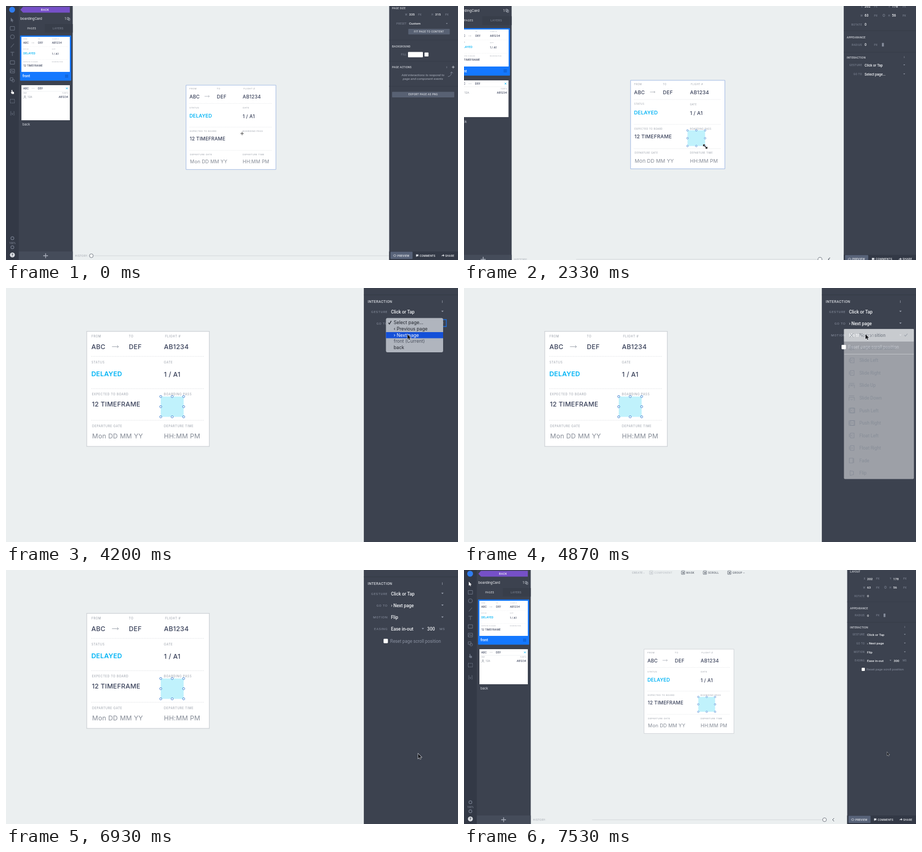
An HTML page with a canvas that plays this animation: 850x478 px, repeating every 8.2 s.

```html
<!DOCTYPE html>
<html lang="en">
<head>
<meta charset="utf-8">
<title>Prototype editor</title>
<style>
  html, body { margin: 0; width: 100%; height: 100%; overflow: hidden; background: #ebeff0; }
  canvas { display: block; }
</style>
</head>
<body>
<canvas id="stage" width="850" height="478"></canvas>
<script>
const ctx = document.getElementById('stage').getContext('2d');
const LOOP = 8200, STEP = 1000 / 15;
const UI = 'Roboto, sans-serif', INTER = 'Inter, sans-serif';
const PANEL = '#3c424f', DARK = '#333946', MUTED = '#8b92a2', BLUE = '#1478ff';
const PANE_RIGHT = 125.5, PANEL_LEFT = 720.6;

// Pointer path in editor coordinates: time, x, y
const POINTER = [
  [0, 444, 240], [65, 444, 240], [133, 441, 239.5], [265, 441, 239.5],
  [1067, 482, 293], [1130, 481, 289], [1267, 476, 276], [1460, 476, 276],
  [1533, 472.4, 267.8], [2334, 472.4, 267.8], [2800, 754.4, 165.3], [3133, 792, 137],
  [3660, 792, 137], [3933, 782, 149], [4130, 782, 149], [4200, 780.8, 152.9],
  [4867, 780.8, 152.9], [4933, 789, 152.9], [5500, 789, 152.9],
  [6340, 795.5, 340], [6467, 795.5, 342.5], [LOOP, 795.5, 342.5]
];
const PAGES = ['Select page...', '‹ Previous page', '› Next page', 'front (Current)', 'back'];
const TRANSITIONS = ['No transition', 'Custom transition', 'Slide Left', 'Slide Right', 'Slide Up',
  'Slide Down', 'Push Left', 'Push Right', 'Float Left', 'Float Right', 'Fade', 'Flip'];

const clamp = v => Math.max(0, Math.min(1, v));
const ease = v => (1 - Math.cos(Math.PI * clamp(v))) / 2;

function pointerAt(t) {
  const i = Math.max(1, POINTER.findIndex(p => p[0] >= t));
  const [a, b] = [POINTER[i - 1], POINTER[i]];
  const k = ease((t - a[0]) / (b[0] - a[0]));
  return { x: a[1] + (b[1] - a[1]) * k, y: a[2] + (b[2] - a[2]) * k };
}

function zoomAt(t) {
  if (t < 2325) return 0;
  return ease((t - 2224) / 455) - ease((t - 7028) / 500);
}

// Text is placed by the middle of its capitals.
function text(str, x, y, size, color, { weight = 400, font = UI, space = 0, align = 'left', style = '' } = {}) {
  ctx.font = `${style} ${weight} ${size}px ${font}`;
  ctx.letterSpacing = space + 'px';
  ctx.textAlign = align;
  ctx.fillStyle = color;
  ctx.fillText(str, x, y + size * 0.36);
}
function rect(x, y, w, h, color, r = 0) {
  ctx.fillStyle = color;
  ctx.beginPath();
  ctx.roundRect(x, y, w, h, r);
  ctx.fill();
}
function frame(x, y, w, h, color, width = 1, r = 0) {
  ctx.strokeStyle = color;
  ctx.lineWidth = width;
  ctx.beginPath();
  ctx.roundRect(x, y, w, h, r);
  ctx.stroke();
}
function circle(x, y, r, fill, stroke, width = 1) {
  ctx.beginPath();
  ctx.arc(x, y, r, 0, 7);
  if (fill) { ctx.fillStyle = fill; ctx.fill(); }
  if (stroke) { ctx.strokeStyle = stroke; ctx.lineWidth = width; ctx.stroke(); }
}
function path(d, x, y, { stroke, fill, width = 1, scale = 1 }) {
  const shape = new Path2D(d);
  ctx.save();
  ctx.translate(x, y);
  ctx.scale(scale, scale);
  ctx.lineWidth = width;
  if (stroke) { ctx.strokeStyle = stroke; ctx.stroke(shape); }
  if (fill) { ctx.fillStyle = fill; ctx.fill(shape); }
  ctx.restore();
}
const ARROW = 'M0 0V7.6L1.8 6L3 8.6L4.2 8L3 5.5H5.4Z';
const RESIZE = 'M-3 -3L3 3M-3.2 -0.5V-3.2H-0.5M3.2 0.5V3.2H0.5';
const HAND = 'M-1 3.5L-3 0.5L-1.5 0V-4H0V-1L3 0V3.5Z';

function card(x, y, border) {
  ctx.save();
  ctx.translate(x, y);
  rect(0, 0, 169, 158.7, '#fff');
  if (border) frame(0, 0, 169, 158.7, border, 0.9);
  ctx.setLineDash([1.2, 1]);
  for (const d of [34.4, 79, 122.6]) path(`M6 ${d}H162`, 0, 0, { stroke: '#d9dcdf', width: 0.6 });
  ctx.setLineDash([]);
  const label = (s, lx, ly) => text(s, lx, ly, 4.1, '#979da7', { font: INTER, space: 0.42 });
  const value = (s, vx, vy, color = '#39415a', weight = 500) =>
    text(s, vx, vy, 9, color, { font: INTER, weight, space: 0.18 });
  label('FROM', 6.5, 7);
  label('TO', 58, 7);
  label('FLIGHT #', 108, 7);
  label('STATUS', 6.5, 42.7);
  label('GATE', 106.5, 43);
  label('EXPECTED TO BOARD', 7, 87);
  label('BOARDING PASS', 106.5, 87);
  label('DEPARTURE GATE', 7.5, 130.6);
  label('DEPARTURE TIME', 106.5, 130.6);
  value('ABC', 6.3, 21.3);
  value('DEF', 58, 21.3);
  value('AB1234', 106.5, 21.3);
  path('M0 0H9M7 -1.8L9 0L7 1.8', 34.8, 21, { stroke: '#9aa0aa', width: 0.7 });
  value('DELAYED', 6.3, 58.2, '#00b4f5', 600);
  value('1 / A1', 106.5, 59.2);
  value('12 TIMEFRAME', 7, 100.6);
  value('Mon DD MM YY', 7.5, 144.2, '#858b96', 400);
  value('HH:MM PM', 106.5, 144.2, '#858b96', 400);
  ctx.restore();
}

function toolStrip(hotspotTool) {
  rect(0, 0, 24, 478, DARK);
  circle(11.5, 7, 5.5, '#2f7df0');
  const stroke = '#6c7484', icon = { stroke };
  path(ARROW, 9, 22, { fill: hotspotTool ? stroke : '#fff' });
  frame(8, 38.5, 8, 7, stroke);
  circle(12, 58, 3.8, null, stroke);
  path('M9 78L15 71', 0, 0, icon);
  path('M8.5 87H15.5M12 87V94', 0, 0, icon);
  frame(8, 103, 8, 6.5, stroke);
  frame(8, 119, 8, 7, stroke);
  path('M8 125L11 121L13 124L15 122', 0, 0, icon);
  frame(8, 135, 5, 5, stroke);
  circle(13.5, 140.5, 2.5, null, stroke);
  path(HAND, 12, 162, { fill: hotspotTool ? '#fff' : stroke });
  ctx.setLineDash([2, 1]);
  frame(8, 175.5, 8, 7, stroke);
  ctx.setLineDash([]);
  text('[v]', 12, 202, 8, stroke, { align: 'center' });
  circle(12, 437, 2.8, null, stroke, 1.4);
  text('100%', 12, 446, 5, MUTED, { align: 'center' });
  circle(12, 454, 2.8, null, stroke, 1.4);
  circle(12, 468.5, 4.6, '#dfe2e7');
  text('?', 12, 468.5, 7, DARK, { align: 'center', weight: 700 });
}

function thumbnail(y, draw) {
  ctx.save();
  ctx.beginPath();
  ctx.rect(29, y, 91, 66);
  ctx.clip();
  rect(29, y, 91, 66, '#fff');
  ctx.translate(29, y);
  draw();
  ctx.restore();
}

function pagesPane() {
  rect(24, 0, PANE_RIGHT - 24, 478, PANEL);
  path('M27 7L32 1.5H120V12.5H32Z', 0, 0, { fill: '#7650c8' });
  text('BACK', 73.5, 7, 5, '#fff', { align: 'center', weight: 500, space: 0.5 });
  text('boardingCard', 27, 24, 6.8, '#e8eaee');
  text('1', 110, 24, 6.5, '#e8eaee');
  frame(115, 21.5, 3, 4, '#aab0bc', 0.8);
  frame(117, 23, 3, 4, '#aab0bc', 0.8);
  rect(73, 34, PANE_RIGHT - 73, 16, '#383e4a');
  text('PAGES', 48.5, 42, 4.8, '#e8eaee', { align: 'center', space: 0.4 });
  text('LAYERS', 98, 42, 4.8, MUTED, { align: 'center', space: 0.6 });
  rect(26.5, 55.5, 96, 85, BLUE, 1);
  thumbnail(58, () => { ctx.scale(0.54, 0.54); card(0, 0); });
  text('front', 31, 132, 6.6, '#fff', { weight: 500 });
  path('M0 0H6M0 2H6M0 4H6', 111, 130, { stroke: '#0a4fb0', width: 0.8 });
  thumbnail(149, () => {
    const ink = '#39415a', bold = { font: INTER, weight: 500 };
    text('ABC', 3.5, 6, 4.9, ink, bold);
    path('M0 0H6', 19, 6, { stroke: '#b5bac2', width: 0.5 });
    text('DEF', 31, 6, 4.9, ink, bold);
    path('M-1.5 -1.5L1.5 1.5M1.5 -1.5L-1.5 1.5', 85.5, 6, { stroke: '#00b4f5', width: 0.9 });
    path('M3 11.5H88', 0, 0, { stroke: '#e3e6e8', width: 0.5 });
    text('SEAT', 4, 15, 2.6, '#a4a9b2');
    text('FLIGHT #', 88, 15, 2.6, '#a4a9b2', { align: 'right' });
    circle(6.5, 21, 1.2, null, '#858b96', 0.7);
    path('M4 25Q6.5 21 9 25', 0, 0, { stroke: '#858b96', width: 0.7 });
    text('12A', 11.5, 22.5, 4.9, '#858b96');
    text('AB1234', 88, 22.5, 4.9, ink, { ...bold, align: 'right' });
  });
  text('back', 31, 223, 6.6, '#c9cdd5');
  rect(24, 462, PANE_RIGHT - 24, 16, '#454c5a');
  path('M-4.5 0H4.5M0 -4.5V4.5', 74.5, 470, { stroke: '#aab0bc', width: 1.4 });
}

function topBar() {
  const item = (s, x, color) => text(s, x, 5, 5, color, { weight: 500, space: 0.35 });
  const glyph = (x, color) => { frame(x, 2, 6, 6, color, 0.9); rect(x + 2, 4, 2.5, 2.5, color); };
  item('CREATE ›', 316, '#b0b5bc');
  glyph(349, '#c3c7cc');
  item('COMPONENT', 358, '#c3c7cc');
  for (const [s, x] of [['MASK', 418], ['SCROLL', 459], ['GROUP –', 505]]) {
    glyph(x - 9, '#646a74');
    item(s, x, '#646a74');
  }
}

function historyBar(done) {
  path(done ? 'M241 470H674' : 'M165 470H721', 0, 0, { stroke: '#d3d7da' });
  text('HISTORY:', 130, 470, 4.8, '#a0a6ae', { space: 0.5 });
  circle(done ? 678 : 160.5, 470, 3.6, '#f6f8f8', '#777d87');
  if (done) path('M2 -3L-1 0L2 3', 694, 470, { stroke: '#555b66' });
}

const heading = (s, y) => text(s, 726, y, 4.9, '#d6d9df', { weight: 500, space: 0.25 });
const label = (s, y, x = 753.5) => text(s, x, y, 4.5, MUTED, { align: 'right', space: 0.5 });
const field = (s, y, x = 758) => text(s, x, y, 6.2, '#f0f2f5', { weight: 500 });
const unit = (s, x, y) => text(s, x, y, 4.5, MUTED, { space: 0.4 });
const chevron = (y, x = 829) => path('M-1.6 -0.8H1.6L0 1Z', x, y, { fill: '#9aa1af' });
const divider = y => path(`M${PANEL_LEFT} ${y}H850`, 0, 0, { stroke: '#353b47', width: 0.8 });
const info = y => text('i', 829, y, 5.5, '#aab0bc', { align: 'center' });
function button(s, x, y, w) {
  rect(x, y, w, 10.5, '#586173', 1);
  text(s, x + w / 2, y + 5.2, 4.8, '#d6d9df', { align: 'center', weight: 500, space: 0.35 });
}
function sizeRow(y, names, values) {
  names.forEach((n, i) => {
    label(n, y, i ? 804 : 755);
    field(values[i], y, i ? 807 : 758);
    unit('PX', i ? 826 : 775, y);
  });
}

function pagePanel() {
  heading('PAGE SIZE', 4);
  sizeRow(16, ['W', 'H'], [335, 315]);
  label('PRESET', 33);
  field('Custom', 33);
  chevron(33);
  button('FIT PAGE TO CONTENT', 756.5, 43, 78);
  divider(64);
  heading('BACKGROUND', 76);
  label('FILL', 91.5);
  rect(756, 86.5, 28, 10, '#fff', 1);
  rect(787, 87.5, 7.5, 7.5, '#fff', 1);
  divider(104);
  heading('PAGE ACTIONS', 115);
  info(115);
  path('M-2.5 0H2.5M0 -2.5V2.5', 841, 115, { stroke: '#c9cdd5' });
  const hint = { align: 'center', style: 'italic' };
  text('Add interactions to respond to', 784, 129.5, 6.2, '#aab0bc', hint);
  text('page and component events', 784, 137, 6.2, '#aab0bc', hint);
  path('M831 133Q838 132 838 124M835.5 126.5L838 124L840.5 126.5', 0, 0, { stroke: MUTED, width: 0.8 });
  divider(151);
  button('EXPORT PAGE AS PNG', 726, 161.5, 117);
}

function hotspotPanel(t, w, h) {
  heading('LAYOUT', 3.5);
  sizeRow(16.5, ['X', 'Y'], [202, 178]);
  sizeRow(33, ['W', 'H'], [w, h]);
  frame(791, 30.5, 3, 4, MUTED, 0.7, 1);
  label('ROTATE', 49);
  field('0', 49);
  divider(60);
  heading('APPEARANCE', 72.3);
  label('RADIUS', 85.3);
  field('0', 85.3);
  unit('PX', 775, 85.3);
  rect(789, 82, 3.5, 6.5, '#858c9b', 0.6);
  divider(98.5);
  heading('INTERACTION', 108);
  info(107.5);
  const row = (name, value, y) => { label(name, y); field(value, y); };
  row('GESTURE', 'Click or Tap', 121.7);
  chevron(121.3);
  row('GO TO', t < 4590 ? PAGES[0] : PAGES[2], 138);
  chevron(137.5);
  if (t < 4590) return;
  const flip = t > 6925, checkY = flip ? 187 : 170.5;
  row('MOTION', flip ? 'Flip' : 'No transition', 154.3);
  chevron(154);
  if (flip) {
    row('EASING', 'Ease in-out', 170.3);
    chevron(170, 802);
    field('300', 170.3, 808);
    unit('MS', 825, 170.3);
  }
  rect(747.8, checkY - 3, 6, 6, '#fff', 1);
  text('Reset page scroll position', 757, checkY, 6.1, MUTED);
}

function actionBar() {
  rect(PANEL_LEFT, 462, 140, 30, DARK);
  rect(723, 462.5, 41.5, 13.5, '#586379', 1);
  const item = (s, x) => text(s, x, 469.8, 4.9, '#f0f2f5', { weight: 500, space: 0.3 });
  path('M-3 0Q0 -3.5 3 0Q0 3.5 -3 0Z', 731, 469.7, { stroke: '#d6d9df', width: 0.8 });
  item('PREVIEW', 736);
  path('M0 0H4.5V3.5H2L0.5 5V3.5H0Z', 771, 467.5, { fill: '#d6d9df' });
  item('COMMENTS', 778);
  path('M0 4Q0 1.5 3 1.5V0L5.5 2.5L3 4.8V3Q1 3 0 4Z', 819, 467, { fill: '#d6d9df' });
  item('SHARE', 826);
}

function hotspot(x, y, w, h) {
  rect(x, y, w, h, 'rgba(140, 232, 250, 0.55)');
  for (const i of [0, 0.5, 1]) for (const j of [0, 0.5, 1])
    if (i !== 0.5 || j !== 0.5) circle(x + w * i, y + h * j, 1.5, '#fff', '#3b7fd0', 0.7);
}

function pageSelect(pointerY) {
  const active = Math.max(0, Math.min(4, Math.floor((pointerY - 59.6) / 11.65)));
  frame(719, 59.5, 109, 13, '#1d6fe0', 1.4);
  rect(714.5, 56.5, 107.5, 64.5, '#b0b5be', 3);
  rect(714.5, 59.6 + active * 11.65, 107.5, 11.65, '#1450d8');
  PAGES.forEach((name, i) => {
    const color = i === active ? '#fff' : i === 3 ? '#4c525e' : '#20242c';
    const y = 65.4 + i * 11.65;
    text(name, 729, y, 8.6, color, { font: INTER });
    if (!i) path('M0 0L2 2.5L5.5 -3.5', 719, y, { stroke: color, width: 1.3 });
  });
}

function transitionIcon(i, y, color) {
  const o = { stroke: color, width: 0.9 };
  if (i === 0) path('M-3.5 -3.5L3.5 3.5M3.5 -3.5L-3.5 3.5', 729, y, o);
  else if (i === 1) path('M-1 -5V5M-5 -3H-2M1 -3H5M-5 0H5M-5 3H-2M1 3H5', 729, y, o);
  else if (i === 4 || i === 5) path('M-5 5V-1H5V5M-5 -4H5M-2 2L0 ' + (i === 4 ? '0' : '4') + 'L2 2', 729, y, o);
  else if (i === 11) path('M-3 -4.5L3.5 -3V3L-3 4.5Z', 729, y, o);
  else {
    const flip = i % 2 ? -1 : 1;
    frame(i === 10 ? 724.5 : 726.5, y - 4.5, 7, 9, color, 0.9);
    if (i === 10) path('M4 -4.5V4.5', 729, y, o);
    else path(`M-5 -3V3M${flip} -2L${-flip} 0L${flip} 2`, 729.5, y, o);
    if (i === 6 || i === 7) frame(724, y - 4.5, 11, 9, color, 0.8);
  }
}

function transitionMenu(pointerY) {
  const gap = 23.55, active = Math.max(0, Math.min(11, Math.floor((pointerY - 77) / gap)));
  rect(714.5, 77, 131.5, 282.5, '#fff', 2);
  rect(714.5, 77.2 + active * gap, 131.5, gap, '#f2f4f6');
  path('M715 124.5H846', 0, 0, { stroke: '#e4e7ea' });
  TRANSITIONS.forEach((name, i) => {
    const y = 89.2 + i * gap, color = i === active ? '#39414f' : '#717a89';
    transitionIcon(i, y, color);
    text(name, 743.5, y, 8.5, color, { weight: i === active ? 500 : 400 });
  });
  path('M-3 0L-1 2.2L3 -2.5', 831, 88.5, { stroke: '#6c7585', width: 1.1 });
}

function pointer(t, { x, y }) {
  if (t < 1100) {
    path('M-3.2 0H3.2M0 -3.2V3.2', x, y, { stroke: '#333', width: 0.9 });
  } else if (t < 2340) {
    path(RESIZE, x, y, { stroke: '#fff', width: 1.8 });
    path(RESIZE, x, y, { stroke: '#111', width: 1.2 });
  } else {
    path(ARROW, x, y, { stroke: '#e4e6ea', fill: '#15171c', width: 1, scale: 0.88 });
  }
}

// Shows a menu from open to close, appearing over two steps.
function popup(t, open, close, draw) {
  if (t < open - 5 || t > close - 5) return;
  ctx.globalAlpha = clamp((t - open) / STEP * 0.5 + 0.5);
  draw();
  ctx.globalAlpha = 1;
}

function render(t) {
  const zoom = zoomAt(t), mouse = pointerAt(t), drawn = t > 264;
  const scale = 1 + 0.364 * zoom, dx = -310 * zoom, dy = -121.5 * zoom;
  const camera = () => ctx.setTransform(scale, 0, 0, scale, dx, dy);
  const corner = t < 1530 ? mouse : { x: 473, y: 268 };
  const box = { x: 440.6, y: 238.8, w: Math.max(1, corner.x - 441.4), h: Math.max(1, corner.y - 240) };

  ctx.setTransform(1, 0, 0, 1, 0, 0);
  rect(0, 0, 850, 478, '#ebeff0');
  camera();
  if (drawn) topBar();
  card(338.6, 149, t < 2500 ? '#9bb5e2' : '#cdd1d5');
  if (drawn) hotspot(box.x, box.y, box.w, box.h);
  historyBar(t > 1795);
  toolStrip(!drawn);
  pagesPane();
  rect(PANEL_LEFT, -5, 140, 500, PANEL);
  if (drawn) hotspotPanel(t, Math.round(box.w * 1.99), Math.round(box.h * 1.99));
  else pagePanel();
  actionBar();

  ctx.setTransform(1, 0, 0, 1, 0, 0);
  const screenY = mouse.y * scale + dy;
  popup(t, 3200, 4600, () => pageSelect(screenY));
  popup(t, 4867, 6933, () => transitionMenu(screenY));
  camera();
  pointer(t, mouse);
}

function tick() {
  const now = performance.now() % LOOP;
  render(Math.floor((now + 4) / STEP) * STEP);
  requestAnimationFrame(tick);
}
tick();
</script>
</body>
</html>
```
